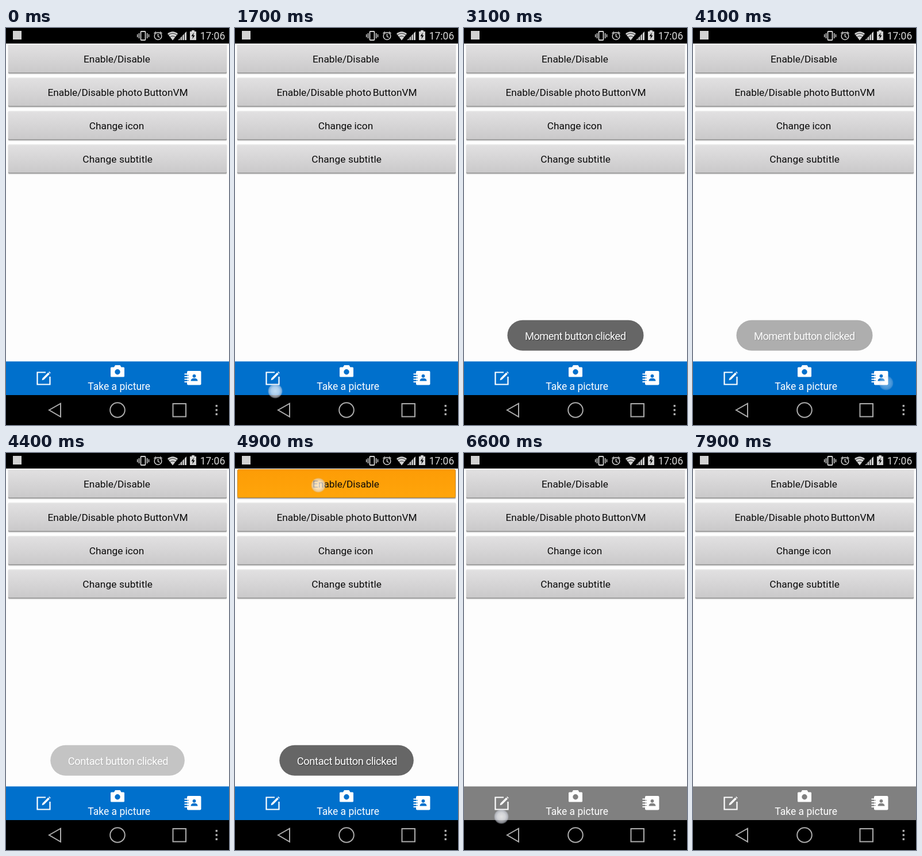
An HTML page for the animation above (8000 ms loop, 388 by 690 pixels).

```html
<!DOCTYPE html>
<html lang="en">
<head>
<meta charset="utf-8">
<title>App bar demo</title>
<style>
html, body { margin: 0; width: 100%; height: 100%; overflow: hidden; background: #fdfdfd; }
svg { display: block; width: 388px; height: 690px; }
text { font: 17.3px Roboto, sans-serif; fill: #0a0a0a; }
.mid { text-anchor: middle; }
.light { fill: #fff; }
.line { fill: none; stroke: #fff; }
.status { fill: #d2d2d2; stroke: none; }
.status .line { stroke: #d2d2d2; stroke-width: 1.5; }
.nav { fill: none; stroke: #acacac; stroke-width: 2; }
.toast rect { fill: #666; }
.toast text { font-size: 18.4px; letter-spacing: -.6px; fill: #fff; text-shadow: 1px 1px 1px #333; }

.bar, .toast, .touch, .pressed { animation: 8s linear infinite; }
.touch, .toast, .pressed { opacity: 0; }

.bar { color: #0070cc; animation-name: bar; animation-timing-function: step-end; }
@keyframes bar { 0% { color: #0070cc; } 72.5%, 100% { color: #808080; } }

.pressed { animation-name: pressed; animation-timing-function: step-end; }
@keyframes pressed { 0% { opacity: 0; } 58.75% { opacity: 1; } 72.5%, 100% { opacity: 0; } }

.moment { animation-name: moment; }
@keyframes moment {
  0%, 23.75% { opacity: 0; animation-timing-function: ease-out; }
  29.375%, 46.875% { opacity: 1; animation-timing-function: ease-in; }
  53.75%, 100% { opacity: 0; }
}
.contact { animation-name: contact; }
@keyframes contact {
  0%, 53.75% { opacity: 0; animation-timing-function: ease-out; }
  58.75%, 76.25% { opacity: 1; animation-timing-function: ease-in; }
  82.5%, 100% { opacity: 0; }
}

/* Touch spots appear at once and fade when lifted. */
.t1 { animation-name: t1; }
.t2 { animation-name: t2; }
.t3 { animation-name: t3; }
.t4 { animation-name: t4; }
.t5 { animation-name: t5; }
@keyframes t1 { 0%, 18.74% { opacity: 0; } 18.75%, 23.75% { opacity: 1; } 26.25%, 100% { opacity: 0; } }
@keyframes t2 { 0%, 47.49% { opacity: 0; } 47.5%, 50% { opacity: 1; } 52.5%, 100% { opacity: 0; } }
@keyframes t3 { 0%, 57.49% { opacity: 0; } 57.5%, 72.5% { opacity: 1; } 75%, 100% { opacity: 0; } }
@keyframes t4 { 0%, 79.99% { opacity: 0; } 80%, 85% { opacity: 1; } 87.5%, 100% { opacity: 0; } }
@keyframes t5 { 0%, 89.99% { opacity: 0; } 90%, 93.75% { opacity: 1; } 96.25%, 100% { opacity: 0; } }
</style>
</head>
<body>
<svg viewBox="0 0 388 690">
  <defs>
    <linearGradient id="grey" x2="0" y2="1">
      <stop stop-color="#e2e1e2"/><stop offset="1" stop-color="#cac9ca"/>
    </linearGradient>
    <linearGradient id="orange" x2="0" y2="1">
      <stop stop-color="#fd9c06"/><stop offset="1" stop-color="#ffa50a"/>
    </linearGradient>
    <radialGradient id="spot">
      <stop stop-color="#fff" stop-opacity=".76"/>
      <stop offset=".55" stop-color="#f4f6fc" stop-opacity=".7"/>
      <stop offset=".85" stop-color="#dce0ec" stop-opacity=".58"/>
      <stop offset="1" stop-color="#ccd0dd" stop-opacity=".2"/>
    </radialGradient>
    <clipPath id="label"><rect x="100" y="515" width="181" height="40"/></clipPath>
    <g id="button">
      <rect x="3.5" y="1" width="381" height="51.5" rx="2" fill="#dcdcdc"/>
      <rect x="4" y="1" width="380" height="50" rx="2" fill="#929292"/>
      <rect x="4" width="380" height="49.5" rx="2" fill="url(#grey)"/>
      <path d="M5 .8H383" stroke="#eee"/>
    </g>
    <circle id="dot" r="12.7" fill="url(#spot)"/>
  </defs>

  <rect width="388" height="690" fill="#fdfdfd"/>

  <use href="#button" y="28"/>
  <use href="#button" y="86"/>
  <use href="#button" y="144"/>
  <use href="#button" y="202"/>
  <rect class="pressed" x="4.5" y="28.5" width="379" height="49" rx="2" fill="url(#orange)" stroke="#cf8c22"/>
  <g class="mid">
    <text x="193" y="59.7">Enable/Disable</text>
    <text x="194.5" y="117.7">Enable/Disable photo<tspan dx="2.6">ButtonVM</tspan></text>
    <text x="192.5" y="175.7">Change icon</text>
    <text x="194.2" y="233.7" letter-spacing=".12">Change subtitle</text>
  </g>

  <rect width="388" height="27" fill="#000"/>
  <g class="status">
    <rect x="12" y="5" width="15" height="15"/>
    <g class="line">
      <rect x="234.5" y="6" width="8" height="15" rx="1" stroke-width="1.8"/>
      <path d="M231.5 9v9M245.7 9v9M228.7 11v5M248.5 11v5"/>
      <circle cx="264.5" cy="14" r="6.3"/>
      <path d="M264.5 10v4.5l3 2M257.5 9.5l3.5-3M271.5 9.5l-3.5-3"/>
    </g>
    <path d="M281 10Q290 2.5 299 10L290 21.5Z"/>
    <path d="M282 12.5Q290 6 298 12.5M285 16Q290 12 295 16" fill="none" stroke="#000" stroke-width=".8"/>
    <path d="M299.5 21L314 6V21Z"/>
    <path d="M303 14v8M306.7 11v11M310.4 7v15" stroke="#000"/>
    <path d="M320 6h3V4h5v2h3v15h-11z"/>
    <path d="M326.8 8l-4.3 6.3h2.7l-1 5 4.3-6.5h-2.7z" fill="#000"/>
    <text x="337.7" y="20" style="fill:#d8d8d8;font-size:17.5px">17:06</text>
  </g>

  <g class="bar">
    <rect y="579.5" width="388" height="58.5" fill="currentColor"/>
    <path class="line" stroke-width="2.2" d="M69 598.5H54.5V619.5H76.5V606"/>
    <path class="light" d="M62.5 612.3l.9-3.5 10-10 2.5 2.5-10 10zM74.2 598l1.1-1.1 2.5 2.5-1.1 1.1z"/>
    <path class="light" d="M183.5 589.5h4.5l2-3.5h8.5l2 3.5h4q1.5 0 1.5 1.5v14q0 1.5-1.5 1.5h-21q-1.5 0-1.5-1.5v-14q0-1.5 1.5-1.5z"/>
    <circle cx="194" cy="597.7" r="4.7" fill="currentColor"/>
    <rect class="light" x="315" y="596" width="24.5" height="24.5" rx="2"/>
    <path class="line" stroke-width="1.8" d="M310.5 601.5h7M310.5 606h7M310.5 610.5h7M310.5 615h7"/>
    <path d="M315 603.7h3M315 608.2h3M315 612.7h3" stroke="currentColor"/>
    <circle cx="327.5" cy="604.8" r="2.9" fill="currentColor"/>
    <path d="M321.5 613.5q0-4.8 6-4.8t6 4.8z" fill="currentColor"/>
    <text class="light mid" x="196.7" y="629.3" style="font-size:17.5px">Take a picture</text>
  </g>

  <rect y="638" width="388" height="52" fill="#000"/>
  <g class="nav">
    <path d="M75 664L95 652.7V675.8Z"/>
    <circle cx="194" cy="664" r="12.8"/>
    <rect x="290.5" y="653" width="22.5" height="22.5"/>
    <path d="M366.3 655v3.4M366.3 662.3v3.4M366.3 669.6v3.4" stroke-width="3.4"/>
  </g>

  <g class="toast moment">
    <rect x="75.5" y="507.7" width="237" height="53" rx="26.5"/>
    <text x="106" y="541.7">Moment button clicked</text>
  </g>
  <g class="toast contact">
    <rect x="77.3" y="507.7" width="233.5" height="53" rx="26.5"/>
    <g clip-path="url(#label)"><text x="107.7" y="541.7" style="letter-spacing:-.42px">Contact button clicked</text></g>
  </g>

  <use class="touch t1" href="#dot" x="70" y="631"/>
  <use class="touch t2" href="#dot" x="336" y="617"/>
  <use class="touch t3" href="#dot" x="145" y="56"/>
  <use class="touch t4" href="#dot" x="65" y="632"/>
  <use class="touch t5" href="#dot" x="79" y="632"/>
</svg>
</body>
</html>
```
